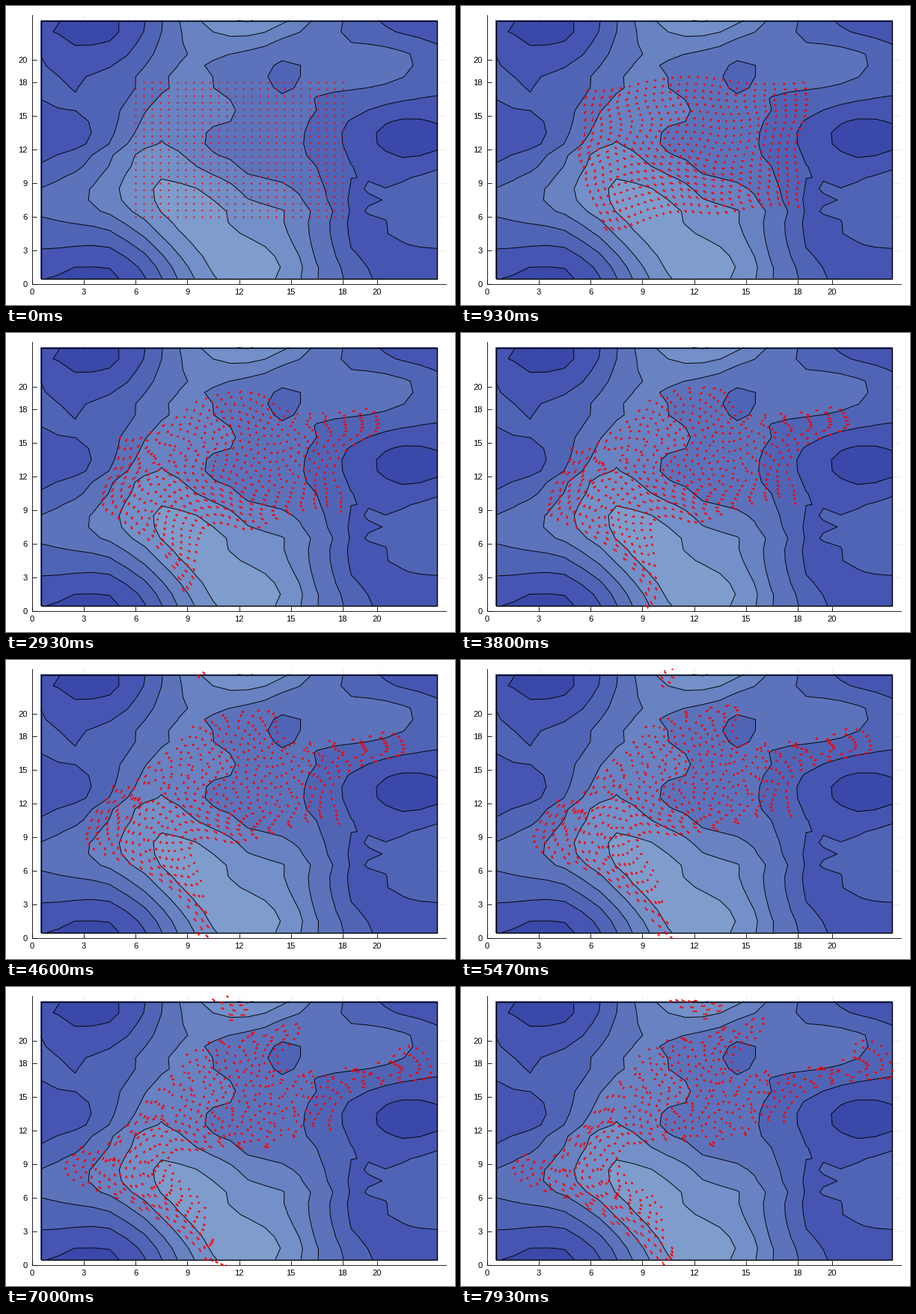
Write a matplotlib script that moves like this. It is 600 by 400 pixels and loops after 8000 ms.

```python
import numpy as np
import matplotlib.pyplot as plt
from matplotlib.animation import FuncAnimation
from matplotlib.patches import Rectangle

N = 24            # periodic cells per side
FRAMES, INTERVAL = 125, 64
SPEED = 1.7       # flow per unit of stream function slope
TRAIL = 3
REACH = 3.3       # correlation length of the field
SHADES = ["#3a48a9", "#4555b1", "#5064b6", "#5c73bb",
          "#6882c2", "#7390c8", "#7e9ccc"]

plt.rcParams["font.family"] = "Liberation Sans"

knots = []


def line(level, *points):
    """A level line passes through a few points."""
    knots.extend((x, y, level) for x, y in points)


def ring(level, x, y, rx, ry, n=8):
    """A closed oval level line."""
    for a in np.arange(n) * 2 * np.pi / n:
        knots.append((x + rx * np.cos(a), y + ry * np.sin(a), level))


# hollows
ring(1, 3.3, 23.45, 1.85, 2.17)
ring(1, 22.1, 13.05, 2.2, 1.65)
ring(3, 14.67, 18.55, 1.13, 1.15, 6)

# slopes around the low ground
line(2, (.5, 10.9), (3, 15), (2.5, 17.5), (4.5, 19.3), (6.5, 23), (5.5, 2.3), (3, 3.45))
line(2, (1.4, 18.4), (20.5, 16.05), (18, 13), (20, 8.6), (23.5, 10.25))
line(2, (20.1, 23.5), (22.5, 21.95))
line(2, (22.5, 3.3), (20.5, 5.65), (18.8, 3))
line(3, (.5, 8.5), (3.5, 11.5), (5.3, 16), (7.5, 22.5), (6.5, 2.8), (3.5, 5.1), (.5, 6))
line(3, (18, 23), (20.5, 21.15), (22, 19.3), (19.5, 17.5), (16.4, 16.5), (15.9, 14),
     (16.85, 9), (17.3, 4))

# slopes around the hill and its ridge
line(4, (9.05, 20.5), (7.5, 17), (5.5, 12.5), (3.35, 8.5), (5.5, 5.4), (8, 1.8))
line(4, (15.5, 22.5), (11.5, 20.5), (10.5, 18.2), (11.5, 14.5), (14.2, 9.2), (16.1, 4.5),
     (16.6, .8))
line(5, (10.5, 22.5), (8.8, 2), (6.5, 5.6), (5.05, 8.6), (8.3, 12), (12, 8.3), (15, 3.9),
     (14.5, 23.2))
line(6, (9.9, 2.5), (7.5, 6.5), (7.5, 9.35), (9.8, 8.3), (12, 4.6), (14.4, 1.5))


def corners(x, y):
    """Cell indices and bilinear weights around each point."""
    i, j = np.floor(x - .5).astype(int), np.floor(y - .5).astype(int)
    fx, fy = x - .5 - i, y - .5 - j
    for a, wx in ((0, 1 - fx), (1, fx)):
        for b, wy in ((0, 1 - fy), (1, fy)):
            yield (j + b) % N * N + (i + a) % N, wx * wy


def sample(field, x, y):
    flat = field.ravel()
    return sum(w * flat[k] for k, w in corners(x, y))


def fit_field(mean=3.2, var=4, noise=.035):
    """Smoothest periodic field through the knots."""
    x, y, level = np.array(knots).T
    rows = np.arange(len(x))
    pick = np.zeros((len(x), N * N))
    for k, w in corners(x, y):
        pick[rows, k] += w
    n = np.arange(N)
    gap = (n[:, None] - n + N // 2) % N - N // 2
    bell = np.exp(-gap ** 2 / (2 * REACH ** 2))
    cov = var * np.kron(bell, bell)
    cross = cov @ pick.T
    gain = np.linalg.solve(pick @ cross + noise ** 2 * np.eye(len(x)), level - mean)
    return (mean + cross @ gain).reshape(N, N)


psi = fit_field()
U = SPEED * (np.roll(psi, -1, 0) - np.roll(psi, 1, 0)) / 2
V = -SPEED * (np.roll(psi, -1, 1) - np.roll(psi, 1, 1)) / 2


def flow(p):
    return np.array([sample(U, *p), sample(V, *p)])


def trace(p, dt):
    path = [p]
    for _ in range(FRAMES - 1):
        k1 = flow(p)
        k2 = flow(p + dt / 2 * k1)
        k3 = flow(p + dt / 2 * k2)
        k4 = flow(p + dt * k3)
        p = p + dt / 6 * (k1 + 2 * k2 + 2 * k3 + k4)
        path.append(p)
    return np.array(path) % N


grid = np.meshgrid(np.linspace(6, 18, 26), np.linspace(6, 18, 21))
path = trace(np.array([g.ravel() for g in grid]), INTERVAL / 1000)

fig = plt.figure(figsize=(6, 4), dpi=100, facecolor="white")
ax = fig.add_axes([35 / 600, 28 / 400, 553 / 600, 360 / 400])
ax.set(xlim=(0, N), ylim=(0, N))

ticks = [*range(0, 19, 3), 20]
ax.set_xticks(ticks)
ax.set_yticks(ticks)
ax.tick_params(direction="in", length=4, width=.6, labelsize=8)
ax.tick_params(axis="x", pad=4)
ax.tick_params(axis="y", pad=4.6)
ax.grid(color="black", alpha=.1, lw=.5)
ax.set_axisbelow(True)
ax.spines[["top", "right"]].set_visible(False)
ax.spines[["left", "bottom"]].set_linewidth(.6)

cells = np.arange(N) + .5
levels = np.arange(1, 7)
ax.contourf(cells, cells, psi, levels=[-50, *levels, 50], colors=SHADES, zorder=1.5)
ax.contour(cells, cells, psi, levels=levels, colors="black", linewidths=.68, zorder=1.6)
ax.add_patch(Rectangle((.5, .5), N - 1, N - 1, fill=False, ec="black", lw=1, zorder=1.7))

dots, = ax.plot([], [], "o", color="red", ms=1.6, mew=0, zorder=5, clip_on=False)


def update(i):
    recent = path[max(0, i - TRAIL + 1):i + 1]
    dots.set_data(recent[:, 0].ravel(), recent[:, 1].ravel())
    return dots,


anim = FuncAnimation(fig, update, frames=FRAMES, interval=INTERVAL,
                     init_func=lambda: update(0), repeat=True, repeat_delay=0)
plt.show()
```
